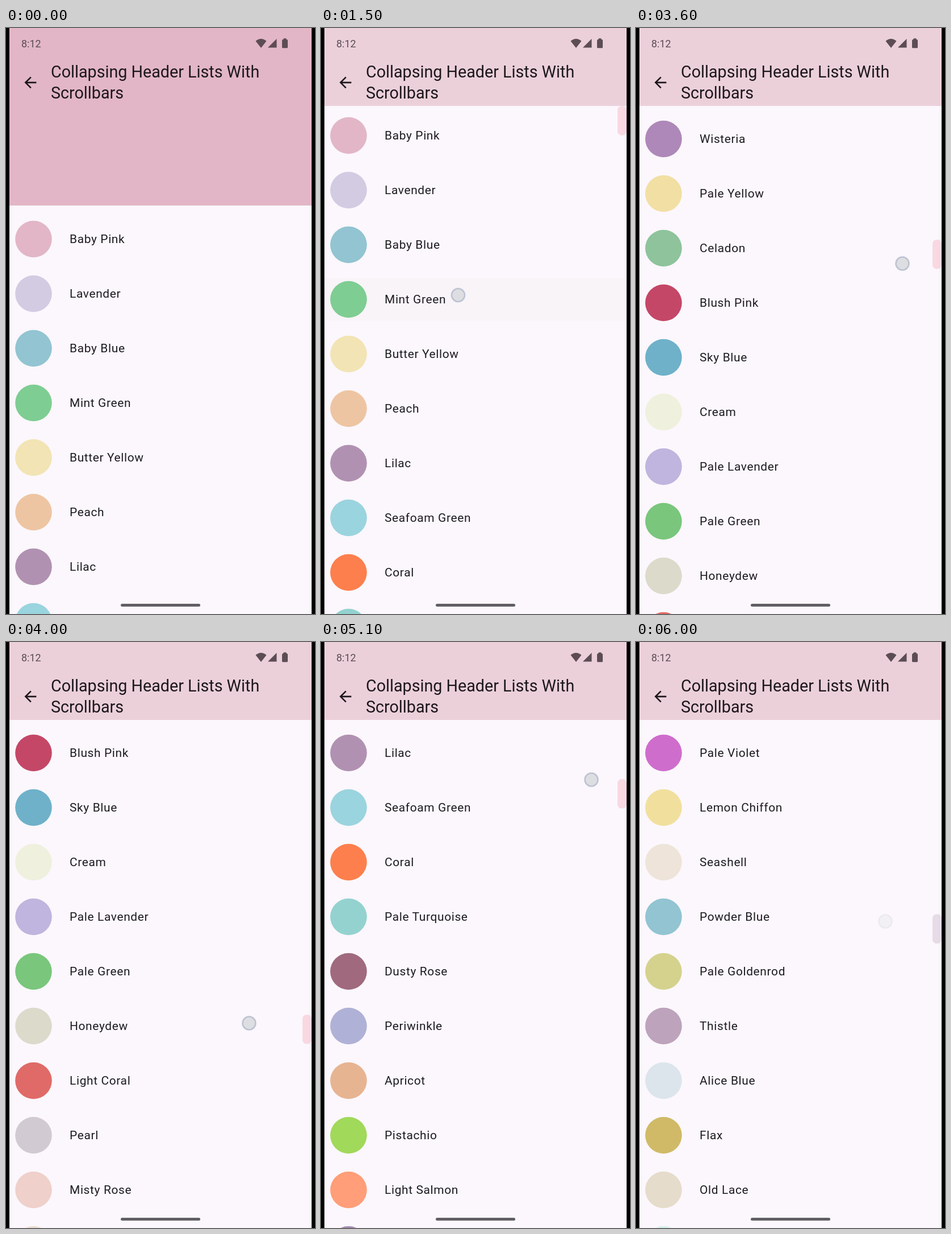
Animation, 544 px wide and 1030 px high, one loop 6.1 s. Source, as an HTML page:

```html
<!DOCTYPE html>
<html lang="en">
<head>
<meta charset="utf-8">
<title>Collapsing header list</title>
<style>
  html, body { margin: 0; width: 100%; height: 100%; overflow: hidden; background: #000; }
  svg { display: block; width: 544px; height: 1030px; font-family: Roboto, sans-serif; }
  .title { font-size: 28.7px; fill: #1c171b; }
  .label { font-size: 20.9px; letter-spacing: .65px; fill: #1d1b20; }
  .status { fill: #5c4d54; font-size: 18px; }
</style>
</head>
<body>
<svg viewBox="0 0 544 1030">
  <defs>
    <clipPath id="screen"><rect x="6" width="532" height="1030"/></clipPath>
  </defs>
  <rect width="544" height="1030" fill="#000"/>
  <g clip-path="url(#screen)">
    <rect x="6" width="532" height="1030" fill="#fbf7fc"/>
    <rect id="press" x="6" width="532" height="75" fill="#f8f4f8"/>
    <g id="list"></g>
    <rect id="header" x="6" width="532"/>
    <g class="status">
      <text x="27" y="33.5">8:12</text>
      <path d="M449 35L439.5 23Q449 15 458.5 23Z"/>
      <path d="M476.5 19V34.5H461Z"/>
      <rect x="486" y="20.3" width="10" height="15" rx="1.5"/>
      <rect x="488.4" y="18.3" width="5.2" height="4" rx="1"/>
    </g>
    <path transform="translate(27.3 80.2) scale(1.305)" fill="#1c171b"
      d="M20 11H7.83l5.59-5.59L12 4l-8 8 8 8 1.41-1.41L7.83 13H20z"/>
    <text class="title" x="79" y="87.3">Collapsing Header Lists With</text>
    <text class="title" x="79" y="123.8">Scrollbars</text>
    <rect id="thumb" x="522" width="16" height="51.5" rx="7"/>
    <g id="touch">
      <circle r="13.2" fill="#c9d2ea" opacity=".6"/>
      <circle r="11.3" fill="#dddee1" stroke="#b9bccb" stroke-width="1.8"/>
    </g>
    <rect x="202" y="1012" width="140" height="5" rx="2.5" fill="#625f64"/>
  </g>
</svg>
<script>
const LOOP = 6100, STEP = 100;
const ROW = 96, FIRST_ROW = 371, EXPANDED = 312, COLLAPSED = 137;
const RANGE = EXPANDED - COLLAPSED;
const ITEMS_PER_PX = 0.4795;
const DRAG_START = 3250;

const colors = `Baby Pink e2b6c6,Lavender d2cbe2,Baby Blue 92c4d2,Mint Green 7ecd92,
Butter Yellow f2e4b4,Peach eec5a3,Lilac b191b2,Seafoam Green 9ad4df,Coral fd7f4d,
Pale Turquoise 94d2d0,Dusty Rose a0697e,Periwinkle b0b1d6,Apricot e7b492,Pistachio a1d95a,
Light Salmon ff9e78,Mauve a58bb0,Wisteria ae88b8,Pale Yellow f2dfa4,Celadon 8ec39c,
Blush Pink c44767,Sky Blue 6fb1c9,Cream eff0dd,Pale Lavender bfb5de,Pale Green 79c67c,
Honeydew dcdacb,Light Coral e06a68,Pearl d2cad2,Misty Rose efd0ca,Lavender Blush ecdccf,
Azure dcf1ec,Vanilla e3cba0,Pale Violet cf6dcc,Lemon Chiffon f1e09d,Seashell eee4d9,
Powder Blue 92c4d2,Pale Goldenrod d5d28e,Thistle bda3bb,Alice Blue dce5ec,Flax d0ba67,
Old Lace e6dccb,Mint Cream d6efe9,Ivory f0eedc,Linen eee0d2,Champagne ecd9b8`
  .split(',').map(entry => {
    const [, name, hex] = entry.trim().match(/^(.+) (\w{6})$/);
    return { name, fill: '#' + hex };
  });

// Tracks: [time, value, ...] points joined by straight lines.
const listScroll = [[750, 0], [900, 22], [1100, 80], [1300, 138], [1500, 182], [1700, 216], [1900, 238], [2050, 245]];
const thumbDrag = [[3250, 138.5], [3400, 235], [3572, 355], [3600, 372], [3800, 530], [4000, 655],
  [4150, 697], [4250, 685], [4372, 651], [4400, 643], [4700, 465], [4950, 288], [5072, 243],
  [5100, 241], [5200, 248], [5400, 320], [5600, 422], [5750, 471], [5850, 478.5]];
const finger = [[3200, 530, 152], [3400, 500, 270], [3600, 469, 414], [3800, 446, 560], [4000, 428, 670],
  [4130, 420, 708], [4250, 418, 690], [4400, 422, 649], [4700, 449, 465], [4950, 470, 290], [5100, 476, 242],
  [5180, 476, 240], [5400, 463, 340], [5600, 448, 440], [5800, 439, 491]];
const fingerAlpha = [[600, 0], [700, 1], [1800, 1], [2000, 0], [2700, 0], [2800, 1], [5900, 1], [6000, .25]];
const pressAlpha = [[800, 0], [1000, 1], [1600, 1], [1900, 0]];
const thumbAlpha = [[750, 0], [900, 1]];
const thumbIdle = [[2000, 0], [2400, 1], [2800, 1], [3000, 0], [5850, 0], [6000, .9]];

function at(track, t, field = 1) {
  const i = track.findIndex(point => point[0] > t);
  if (i === 0) return track[0][field];
  if (i < 0) return track[track.length - 1][field];
  const a = track[i - 1], b = track[i];
  return a[field] + (b[field] - a[field]) * (t - a[0]) / (b[0] - a[0]);
}

const mix = (a, b, k) => `rgb(${a.map((v, i) => Math.round(v + (b[i] - v) * k))})`;
const byId = id => document.getElementById(id);
const set = (node, attrs) => Object.entries(attrs).forEach(([key, value]) => node.setAttribute(key, value));

function add(parent, tag, attrs) {
  const node = document.createElementNS('http://www.w3.org/2000/svg', tag);
  set(node, attrs);
  return parent.appendChild(node);
}

const [list, header, press, thumb, touch] = ['list', 'header', 'press', 'thumb', 'touch'].map(byId);
const rows = Array.from({ length: 12 }, () => {
  const group = add(list, 'g', {});
  return {
    group,
    dot: add(group, 'circle', { cx: 48.5, r: 32.3 }),
    label: add(group, 'text', { class: 'label', x: 112, y: 7.4 }),
  };
});

function render(t) {
  const dragging = t >= DRAG_START;
  const firstItem = Math.floor((at(thumbDrag, t - 28) - COLLAPSED) * ITEMS_PER_PX);
  const scroll = dragging ? RANGE + 1 + firstItem * ROW : at(listScroll, t);
  const collapse = Math.min(scroll, RANGE);
  const bottom = EXPANDED - collapse;

  const top = Math.max(0, Math.floor((scroll - RANGE) / ROW));
  rows.forEach(({ group, dot, label }, i) => {
    const item = colors[(top + i) % colors.length];
    set(group, { transform: `translate(0 ${FIRST_ROW - scroll + (top + i) * ROW})` });
    set(dot, { fill: item.fill });
    if (label.textContent !== item.name) label.textContent = item.name;
  });

  set(header, { height: bottom, fill: mix([226, 182, 198], [235, 208, 218], collapse / RANGE) });
  set(press, { y: FIRST_ROW + 3 * ROW - scroll - 37, opacity: at(pressAlpha, t) });

  const rolled = Math.max(0, scroll - RANGE) / ROW / ITEMS_PER_PX;
  set(thumb, {
    y: dragging ? at(thumbDrag, t) : bottom + rolled,
    opacity: at(thumbAlpha, t),
    fill: mix([249, 216, 226], [228, 220, 232], at(thumbIdle, t)),
  });

  const swiping = t < 2500;
  const x = swiping ? 241.5 : at(finger, t, 1);
  const y = swiping ? 651.5 - scroll : at(finger, t, 2);
  set(touch, { transform: `translate(${x} ${y})`, opacity: at(fingerAlpha, t) });
}

const start = performance.now();
function tick() {
  const t = (performance.now() - start) % LOOP;
  render(Math.floor(t / STEP) * STEP);
  requestAnimationFrame(tick);
}
tick();
</script>
</body>
</html>
```
